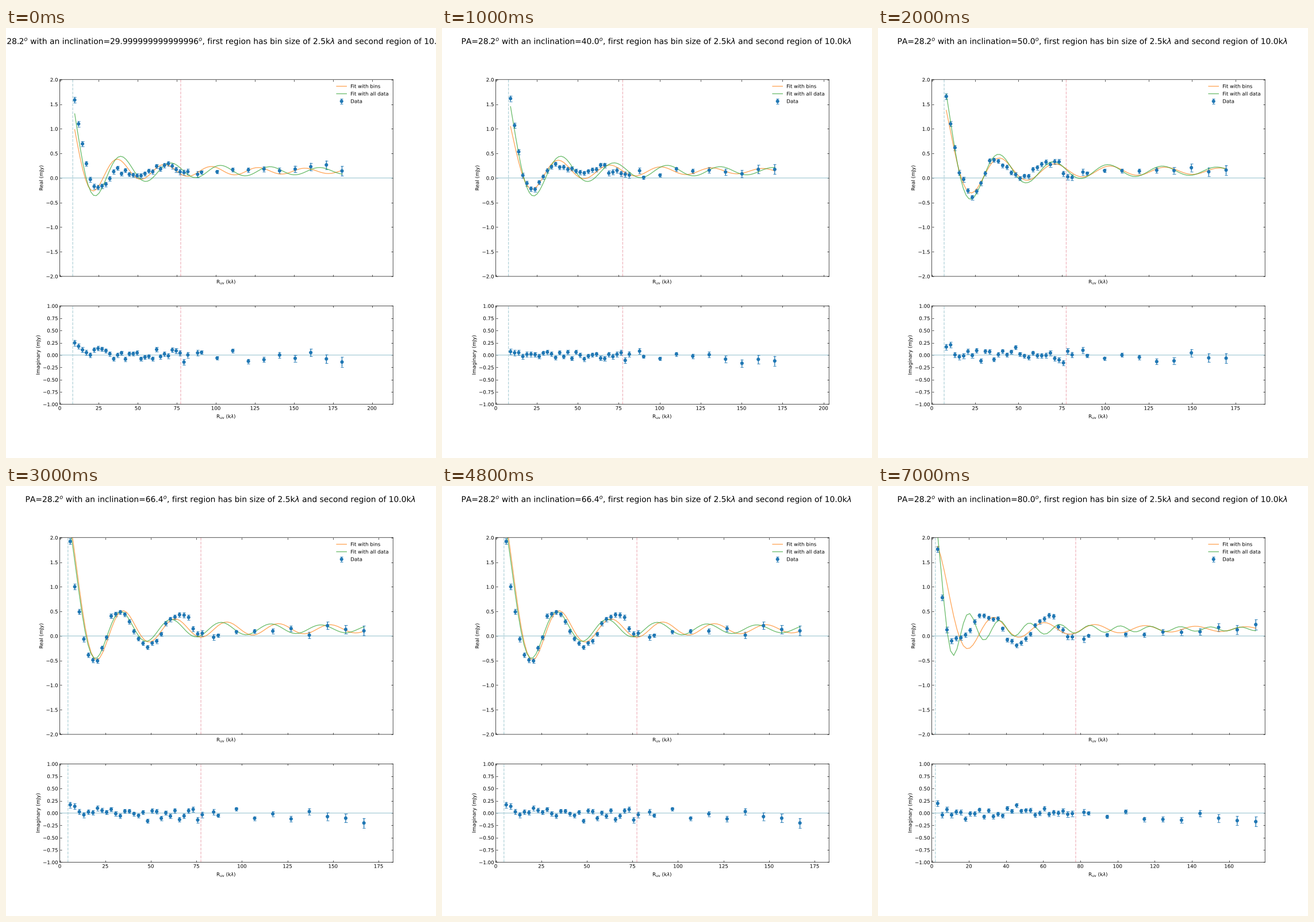
Animation of 748x748 px, one loop 8000 ms. Source, as a matplotlib script:

```python
import numpy as np
import matplotlib.pyplot as plt
from matplotlib.animation import FuncAnimation
from matplotlib.patheffects import Normal

STEP, WIDE, SPLIT = 2.5, 10.0, 77.5
NARROW = 30                       # number of narrow bins
ORDER = [0, 1, 2, 3, 3, 3, 4, 5]  # view shown in each second of the loop

# inclination, first edge, x limit, point count,
# (k, amplitude) of the binned and full fits, point of the first dip, turning levels
VIEWS = [
    ("29.999999999999996", 8.33, 213.5, 41, (.2098, 1.87), (.198, 2.33),
     6, (1.58, -.25, .20, .06, .25, .12, .20)),
    ("40.0", 7.77, 203.4, 40, (.2025, 1.71), (.1947, 2.34),
     5, (1.60, -.24, .26, .13, .22, .05, .17)),
    ("50.0", 7.13, 192.05, 40, (.1983, 2.06), (.2007, 2.65),
     6, (1.65, -.38, .38, .02, .32, .08, .18)),
    ("66.4", 4.49, 182.95, 40, (.2222, 2.90), (.2299, 2.76),
     5, (1.83, -.48, .50, -.22, .44, .01, .18)),
    ("70.0", 3.86, 181.6, 40, (.2266, 2.75), (.2437, 2.65),
     5, (1.84, -.44, .48, -.20, .42, .00, .20)),
    ("80.0", 1.94, 179.4, 41, (.2322, 1.85), (.387, 2.49),
     3, (1.80, -.12, .42, -.14, .40, -.01, .18)),
]

# Unsnapped outlines keep text and lines at fractional pixel positions.
plt.rcParams.update({"font.family": "DejaVu Sans", "text.hinting": "none",
                     "path.snap": False, "path.effects": [Normal()]})
fig = plt.figure(figsize=(12, 12), dpi=748 / 12)


def positions(start, count):
    """Centres of the narrow bins, one joining bin, then the wide bins."""
    edge = start + STEP * NARROW
    near = start + STEP * (np.arange(NARROW) + 0.5)
    far = edge + 3 * STEP + WIDE * np.arange(count - NARROW - 1)
    return np.concatenate([near, [edge + WIDE / 2], far])


def errors(count):
    near = 0.042 + 0.016 * np.linspace(-1, 1, NARROW) ** 2
    far = 0.033 + 0.067 * np.linspace(0, 1, count - NARROW - 1) ** 1.5
    return np.concatenate([near, [0.06], far])


def trend(count, dip, levels):
    """Steep fall to the first dip, then eased swings between levels."""
    at, y = np.array([0, dip, 11, 17, 24, 29, count - 1]), np.array(levels)
    i = np.arange(count)
    s = np.clip(np.searchsorted(at, i, side="right") - 1, 0, len(at) - 2)
    t = (i - at[s]) / (at[s + 1] - at[s])
    mix = np.where(s == 0, np.sin(np.pi * t / 2), (1 - np.cos(np.pi * t)) / 2)
    return y[s] + (y[s + 1] - y[s]) * mix


def drift(count):
    """Small rise at short spacings, slow sag across the wide bins."""
    i = np.arange(count)
    return 0.15 * np.exp(-i / 2) - 0.1 * np.clip((i - NARROW) / 10, 0, 1)


def fit(x, k, amp):
    return 0.142 + amp * np.sinc(k * x / np.pi)


def panel(ax, x, y, start, xmax, limit, name):
    ax.axhline(0, color="#a9cdd8")
    ax.axvline(start, color="#b4d3da", ls="--")
    ax.axvline(SPLIT, color="#f0b8c0", ls="--")
    ax.errorbar(x, y, yerr=errors(len(x)), fmt="o", color="tab:blue",
                capsize=3, label="Data")
    ax.set(xlim=(0, xmax), ylim=(-limit, limit), ylabel=name,
           xlabel=r"R$_{\mathrm{uv}}$ (k$\lambda$)")
    ax.tick_params(direction="in", top=True, right=True)


def draw(i):
    incl, start, xmax, count, bins, full, dip, levels = VIEWS[ORDER[i]]
    rng = np.random.default_rng(ORDER[i])
    x = positions(start, count)
    real = trend(count, dip, levels) + rng.normal(0, 0.045, count)
    imag = drift(count) + rng.normal(0, 0.065, count)

    fig.clear()
    top, low = fig.subplots(2, 1, gridspec_kw=dict(
        height_ratios=[2, 1], left=0.125, right=0.9, bottom=0.125, top=0.88,
        hspace=0.2))
    panel(top, x, real, start, xmax, 2, "Real (mJy)")
    panel(low, x, imag, start, xmax, 1, "Imaginary (mJy)")

    grid = np.linspace(x[0], x[-1], 100)
    for params, color, label in ((bins, "tab:orange", "Fit with bins"),
                                 (full, "tab:green", "Fit with all data")):
        top.plot(grid, fit(grid, *params), color=color, alpha=0.7, label=label)
    top.tick_params(labelbottom=False)
    top.legend(loc="upper right", frameon=False)
    fig.suptitle(rf"PA=28.2$^o$ with an inclination={incl}$^o$, first region has "
                 r"bin size of 2.5k$\lambda$ and second region of 10.0k$\lambda$",
                 fontsize=16)
    return []


anim = FuncAnimation(fig, draw, frames=len(ORDER), init_func=lambda: [],
                     interval=1000, repeat=True, repeat_delay=0)
plt.show()
```
